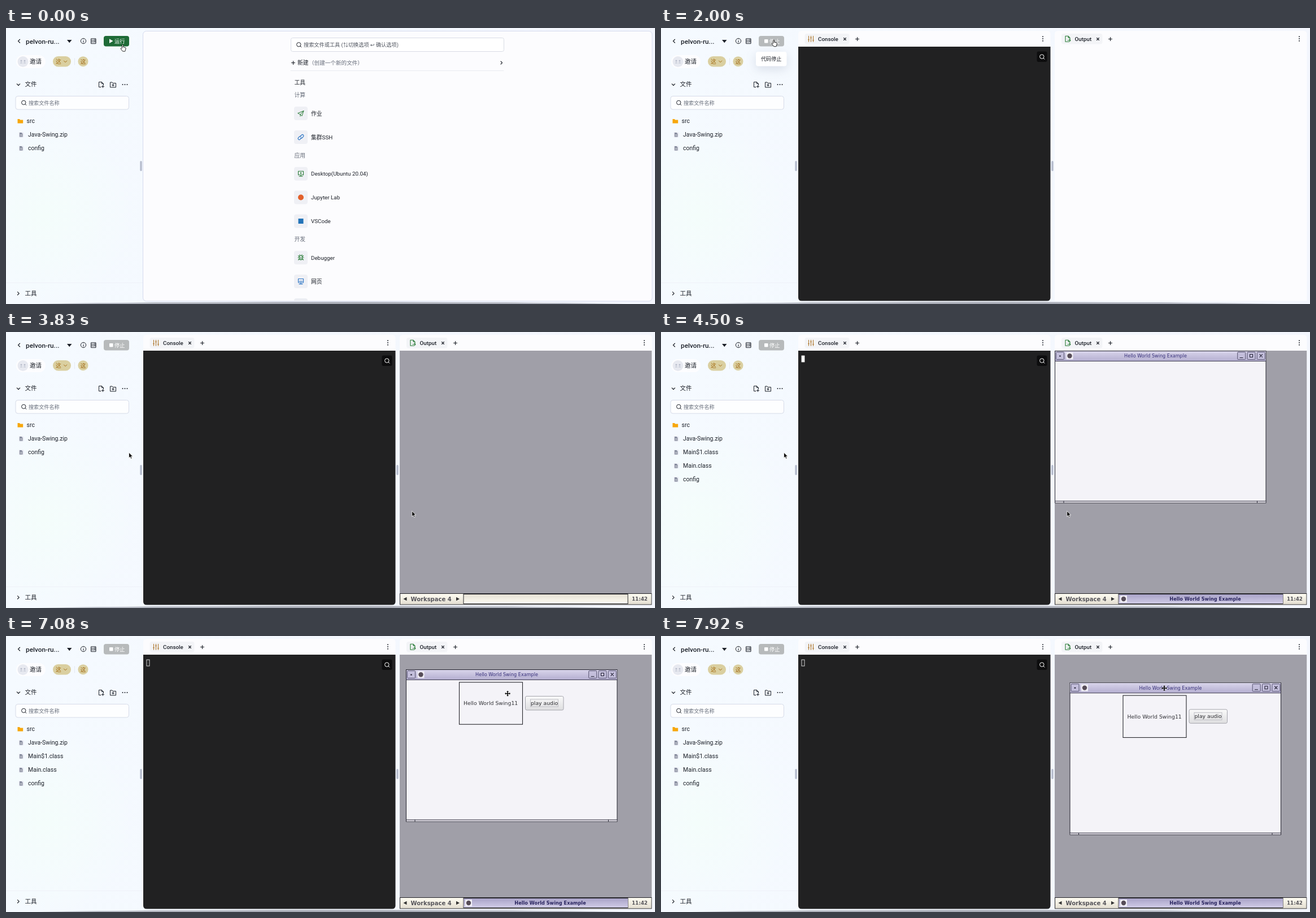
Write an HTML page that moves like this. It is 1149 px wide and 488 px high and loops after 8 s.

```html
<!DOCTYPE html>
<html lang="zh">
<head>
<meta charset="utf-8">
<title>Workspace</title>
<style>
html, body { margin: 0; width: 100%; height: 100%; overflow: hidden; background: #f4f8fd; }
svg { display: block; width: 100vw; height: 100vh; }
text { font-family: Roboto, "Noto Sans CJK SC", "Noto Sans CJK", "DejaVu Sans", sans-serif; white-space: pre; }
.dv { font-family: "DejaVu Sans", sans-serif; }
.line { fill: none; stroke-linecap: round; stroke-linejoin: round; }
#tip rect { filter: drop-shadow(0 5px 9px rgba(70, 80, 110, .16)); }
</style>
</head>
<body>
<svg id="stage" viewBox="0 0 1149 488" xmlns="http://www.w3.org/2000/svg"></svg>
<script>
const INK = '#1d2129', GREY = '#676d7a', GREEN = '#277a35', BLUE = '#2b74c4';

// Text placed by its left edge (or anchor) and its vertical centre.
const text = (x, mid, str, size = 9.8, fill = INK, extra = '') =>
  `<text x="${x}" y="${mid + size * .36}" font-size="${size}" fill="${fill}" ${extra}>${str}</text>`;
const rect = (x, y, w, h, fill, rx = 0, extra = '') =>
  `<rect x="${x}" y="${y}" width="${w}" height="${h}" rx="${rx}" fill="${fill}" ${extra}/>`;
const line = (d, stroke = INK, width = 1) =>
  `<path class="line" d="${d}" stroke="${stroke}" stroke-width="${width}"/>`;
const shape = (d, fill) => `<path d="${d}" fill="${fill}"/>`;
const circle = (x, y, r, fill, extra = '') =>
  `<circle cx="${x}" cy="${y}" r="${r}" fill="${fill}" ${extra}/>`;
const at = (x, y, inner) => `<g transform="translate(${x} ${y})">${inner}</g>`;
const group = (id, inner) => `<g id="${id}">${inner}</g>`;

const lens = (x, y, stroke = INK) => at(x, y,
  circle(-.4, -.4, 3.7, 'none', `stroke="${stroke}" stroke-width="1"`) + line('M2.3 2.3L4.2 4.2', stroke));
const plus = (x, y) => line(`M${x - 3} ${y}h6m-3 -3v6`, INK, 1.2);
const cross = (x, y) => line(`M${x - 2} ${y - 2}l4 4m0 -4l-4 4`, INK, 1.1);
const dots = (x, y, dx, dy) => [-1, 0, 1].map(i => circle(x + i * dx, y + i * dy, 1, INK)).join('');
const medium = 'font-weight="500"';

const gradient = (id, from, to, vertical = true) =>
  `<linearGradient id="${id}" x2="${vertical ? 0 : 1}" y2="${vertical ? 1 : 0}">
    <stop stop-color="${from}"/><stop offset="1" stop-color="${to}"/></linearGradient>`;

const defs = `<defs>
  ${gradient('side', '#f5faff', '#f3f6fd', false)}
  ${gradient('lilac', '#d8d4ea', '#b4aed0')}
  ${gradient('cream', '#fffdf3', '#e2ddd0')}
  ${gradient('slot', '#e4dfd3', '#fffdf4')}
  ${gradient('task', '#a9a3c8', '#d0cbe6')}
  ${gradient('push', '#fafafa', '#dedee0')}
  <radialGradient id="mint"><stop stop-color="#f4fdfb"/><stop offset="1" stop-color="#f4fdfb" stop-opacity="0"/></radialGradient>
  <radialGradient id="shade"><stop stop-color="#777a85" stop-opacity=".75"/><stop offset=".9" stop-color="#888b98" stop-opacity=".55"/>
    <stop offset="1" stop-color="#999" stop-opacity="0"/></radialGradient>
  <clipPath id="mainClip"><rect x="243" y="6" width="901" height="477" rx="6"/></clipPath>
  <clipPath id="outClip"><rect x="697" y="33" width="446.500" height="449.500" rx="0"/></clipPath>
</defs>`;

const fileIcon = y => rect(22, y - 4.5, 9.5, 9.5, '#eceef5', 2) +
  shape(`M24 ${y - 3.5}h3.5l2 2v5.500h-5.500z`, '#858b9d') +
  line(`M25.500 ${y}h2.500m-2.500 2h2.500`, '#fff', .7);
const fileRow = (y, name) => at(0, 0, fileIcon(y) + text(39, y, name, 10.5));

function sidebar() {
  const people = [27, 33].map(x => circle(x, 58, 1.5, '#b9bdcb') +
    shape(`M${x - 2.5} 62.500q2.500 -4 5 0z`, '#c6cad6')).join('');
  return rect(0, 0, 1149, 488, 'url(#side)') +
    '<ellipse cx="70" cy="330" rx="160" ry="170" fill="url(#mint)"/>' +
    line('M24.500 20.200l-3 2.900 3 2.900', INK, 1.3) +
    text(35, 23.3, 'pelvon-ru...', 11.8, INK, medium) +
    shape('M108 21h8.500l-4.250 5.200z', INK) +
    circle(137, 23, 4.6, 'none', `stroke="${INK}"`) + line('M137 22.700v2.600M137 20.700v.1', INK, 1.1) +
    line('M151 18.800h8v8.800h-8zM151 21.700h8m-8 2.900h8M157 20.300h.3m-.3 2.900h.3', INK, 1) +
    rect(18, 48, 52, 23, '#fdfdff', 11.5) + circle(30, 59.5, 9.5, '#e7e9f0') + people +
    text(42, 59, '邀请', 10.5) +
    rect(83, 50, 32, 18.500, '#dacfa0', 9.2) + text(88, 59.2, '这', 9.8, '#a36b12') +
    line('M102.500 58l2.600 2.600 2.600 -2.600', '#a36b12') +
    line('M121.500 53.500v11.500', '#e6e9f1') +
    circle(136.500, 59.2, 9, '#dacfa0') + text(131.700, 59.2, '这', 9.6, '#9a5f08') +
    line('M19.300 98.800l2.700 2.700 2.700 -2.700', INK, 1.2) + text(33.500, 99.6, '文件', 10.5, INK, medium) +
    line('M168 104.500h-3.500v-9h5l3 3v2.500M169.500 95.500v3h3M171.500 101.500v4m-2 -2h4') +
    line('M184.500 104.500v-8.500h3.500l1.200 1.500h5.300v7zM189.500 99v4m-2 -2h4') +
    dots(210.500, 100, 4, 0) +
    rect(17, 120.500, 200.500, 23.500, '#fdfeff', 4, 'id="field" stroke="#d6dbe8"') +
    lens(31.700, 132.300) + text(40, 132.300, '搜索文件名称', 9.1, GREY) +
    shape('M20.500 161h3.500l1.200 1.500h5v6h-9.700z', '#f7a70d') + text(36.500, 164.500, 'src', 10.5) +
    fileRow(188.500, 'Java-Swing.zip') +
    group('classes', fileRow(212.500, 'Main$1.class') + fileRow(236.500, 'Main.class')) +
    group('config', fileRow(212.500, 'config')) +
    line('M0 450.500h242', '#eef1f8') +
    line('M20.500 466.600l2.700 2.700 -2.700 2.700', INK, 1.2) + text(33.500, 469, '工具', 10.5, INK, medium) +
    '<ellipse cx="575" cy="489" rx="550" ry="5" fill="url(#shade)"/>' +
    rect(237.300, 235, 3.400, 18, '#b6bccd', 1.7);
}

const runButton = group('run', rect(173, 14, 45, 18.500, '#1f6b37', 4) +
    shape('M183 19.300v7.600l6.600 -3.800z', '#fff') + text(192, 23.3, '运行', 9.3, '#fff')) +
  group('stop', rect(173, 14, 45, 18.500, '#b7babb', 4) +
    group('stopLabel', rect(183, 20, 6.500, 6.500, '#fff', 1) + text(192, 23.3, '停止', 9.3, '#fff')));

const monitor = c => line('M-4.500 -4.500h9v6.500h-9zM0 2v2.500M-3 4.600h6', c, 1.1);
const toolIcons = {
  plane: line('M-5 -.5L5 -4.500 2 4.500 -1 2zM5 -4.500L-1 2v3', GREEN, 1),
  link: line('M-.5 -2l1.800 -1.800a2 2 0 0 1 3 3l-1.800 1.800a2 2 0 0 1 -2.800 0M.5 2l-1.800 1.800a2 2 0 0 1 -3 -3l1.800 -1.800a2 2 0 0 1 2.800 0', BLUE, 1.1),
  desk: monitor(GREEN) + circle(0, -1.2, 1.3, GREEN),
  orange: circle(0, 0, 5, '#e2602b'),
  blue: rect(-4.500, -4.500, 9, 9, '#2273b8'),
  bug: line('M-2.500 -1.500a2.500 2.500 0 0 1 5 0v3a2.500 2.500 0 0 1 -5 0zM-2.500 0h-2.500M2.500 0h2.500M-2.500 -1.500l-2 -1.800M2.500 -1.500l2 -1.800M-2.500 2l-2 2M2.500 2l2 2M0 -1v3.500M-1.500 -4l-.8 -1M1.500 -4l.8 -1', GREEN, 1.1),
  web: monitor(BLUE) + line('M-3 -.2h6', BLUE)
};
const tool = (y, icon, label) => rect(510, y - 12, 24, 24, '#eff0f5', 4) +
  at(522, y, toolIcons[icon]) + text(540, y, label);

const home = group('home',
  rect(242.500, 5.500, 901.500, 477.500, '#fcfcfe', 6, 'stroke="#d5daee"') +
  '<g clip-path="url(#mainClip)">' +
  rect(504.500, 17.500, 377, 24, '#fff', 3, 'stroke="#d9dce5"') + lens(518.700, 29.700) +
  text(527, 29.700, '搜索文件或工具 (⇅切换选项 ↩ 确认选项)', 9.2, '#50555f') +
  plus(508.500, 61.500) + text(516, 61.300, '新建', 9.8, INK, medium) + text(536, 61.300, '（创建一个新的文件）', 9.6, GREY) +
  line('M876 59l2.500 2.500 -2.500 2.500', INK, 1.1) + line('M504 75.500h377', '#e9ebf0') +
  text(510.500, 96, '工具', 9.8, INK) + text(510.500, 118.500, '计算', 9.8, GREY) +
  tool(151, 'plane', '作业') + tool(193, 'link', '集群SSH') +
  text(510.500, 225, '应用', 9.8, GREY) +
  tool(257.700, 'desk', 'Desktop(Ubuntu 20.04)') + tool(299.500, 'orange', 'Jupyter Lab') + tool(341.500, 'blue', 'VSCode') +
  text(510.500, 373.500, '开发', 9.8, GREY) +
  tool(406, 'bug', 'Debugger') + tool(448, 'web', '网页') + rect(510, 478, 24, 24, '#eceef3', 4) + '</g>');

const panel = (x, w, tab, label, tabW, icon) =>
  `<path d="M${x} 33v-22q0 -6 6 -6h${w - 12}q6 0 6 6v22z" fill="#fcfcfe"/>` +
  rect(tab, 10, tabW, 18.500, '#f3f4f7', 4) + at(tab + 11, 19.3, icon) +
  text(tab + 23.500, 19.3, label, 9.8, INK, medium) +
  cross(tab + tabW - 8, 19.5) + plus(tab + tabW + 14, 19.5) + dots(x + w - 13.500, 19, 0, 3.700);

const sliders = line('M-4 -5v10M0 -5v10M4 -5v10M-5 1.500h2M-1 -2h2M3 2.500h2', '#b0782f', 1.1);
const exportIcon = line('M2 5h-6v-10h5l3 3v2.500M1 -5v3h3M0 2.500h5m-2 -2l2 2 -2 2', GREEN, 1.1);

const consolePanel = group('console',
  panel(243, 446.500, 254.500, 'Console', 79, sliders) +
  shape('M243 33h446.500v443.500q0 6 -6 6h-434.500q-6 0 -6 -6z', '#212122') +
  rect(665.500, 41.500, 18, 18.500, '#0d0d0e', 3) + lens(674.700, 51, '#fff') +
  rect(249, 42, 5, 11, '#fff', 0, 'id="caret" stroke="#fff" stroke-width=".8"'));

const frameButton = (x, glyph) => rect(x, 35.500, 14, 13, '#c3bedb', 1, 'stroke="#55526e"') + line(glyph, '#1f1d30', 1.1);
const appIcon = (x, y) => rect(x - 6, y - 6, 12, 12, '#f1eff6') + circle(x, y, 4.2, '#574d58');

const javaWindow = group('window',
  rect(697.500, 33.500, 373.500, 268.500, '#f4f3f8', 0, 'stroke="#23222d"') +
  rect(698, 34, 372.500, 17.500, 'url(#lilac)') + line('M697.500 51.500h373.500', '#3c3a4e') +
  frameButton(699.500, 'M705.700 42h1.500v1h-1.500z') + appIcon(723.500, 42.300) +
  text(875.500, 42.300, 'Hello World Swing Example', 8.1, '#37307a', 'class="dv" text-anchor="middle"') +
  frameButton(1020.700, 'M1025 45.500h5') + frameButton(1038, 'M1042.500 39.500h5v5h-5z') + frameButton(1055.300, 'M1060 39.700l4.600 4.600m0 -4.600l-4.600 4.600') +
  rect(698, 299, 372.500, 2.500, '#e9e6ee') + line('M697.500 299h373.500M713 299v3M1055.500 299v3', '#2b2a38') +
  group('content',
    rect(791.500, 55.800, 112, 74.400, 'none', 0, 'stroke="#26262b" stroke-width="1.1"') +
    text(799, 93, 'Hello World Swing11', 9.36, '#333338', 'class="dv"') +
    rect(908.500, 80.500, 67.500, 24.500, 'url(#push)', 2.5, 'stroke="#a5a5ad"') +
    rect(917.500, 86, 49, 13, 'none', 0, 'stroke="#b3b3bb" stroke-width=".8"') +
    text(918, 92.300, 'play audio', 9.25, '#28282c', 'class="dv"')));

const outputPanel = group('output',
  panel(697, 446.500, 709, 'Output', 72.500, exportIcon) +
  rect(697, 33, 446.500, 449.500, '#fcfcfe') +
  '<g id="desktop" clip-path="url(#outClip)">' + rect(697, 33, 446.500, 450, '#a09fa8') + javaWindow +
  rect(697.500, 462.500, 445.500, 19.500, 'url(#cream)', 0, 'stroke="#26262b"') +
  shape('M709.500 468.800v6.400l-6 -3.200zM797 468.800v6.400l6 -3.200z', '#333') +
  text(716.500, 472.300, 'Workspace 4', 10, '#55545a', 'class="dv" font-weight="700"') +
  rect(810, 463.500, 291, 17, 'url(#slot)', 0, 'stroke="#26262b"') +
  group('task', rect(810.500, 464, 290.500, 16, 'url(#task)') + appIcon(819, 472) +
    text(963.500, 471.700, 'Hello World Swing Example', 8.2, '#28235e', 'class="dv" font-weight="700" text-anchor="middle"')) +
  text(1108, 472, '11:42', 8.75, '#55545a', 'class="dv" font-weight="700"') + '</g>');

const tooltip = group('tip', rect(168, 42, 54.500, 25.500, '#fff', 4) +
  '<text id="tipText" x="177" y="57.600" font-size="9.1" fill="#1d2129"></text>');

const arrow = id => group(id, '<path d="M0 0v9.800l2.300 -2 1.500 3.500 1.700 -.7 -1.500 -3.500h3z" fill="#0c0c0c" stroke="#fff" stroke-width=".8"/>');
const cursors = arrow('remote') + arrow('pointer') +
  group('hand', '<path d="M3 6.400V1.300a1 1 0 0 1 2 0v3.200l3.600 .8a1.400 1.400 0 0 1 1 1.600l-.7 3.400 -.6 1.700h-4.200l-3.300 -4.300a.9 .9 0 0 1 1.300 -1.200z" fill="#fff" stroke="#111" stroke-width=".9"/>') +
  group('move', '<path d="M0 -5l2 2h-1.200v2.200h2.200v-1.200l2 2 -2 2v-1.200h-2.200v2.200h1.200l-2 2 -2 -2h1.200v-2.200h-2.200v1.200l-2 -2 2 -2v1.200h2.200v-2.200h-1.200z" fill="#0a0a0a" stroke="#fff" stroke-width=".7" paint-order="stroke"/>');

const stage = document.getElementById('stage');
stage.innerHTML = defs + sidebar() + runButton + home +
  group('work', consolePanel + outputPanel + rect(691.300, 235, 3.400, 18, '#b6bccd', 1.7)) + tooltip + cursors;

const el = Object.fromEntries([...stage.querySelectorAll('[id]')].map(node => [node.id, node]));
const show = (id, on) => el[id].setAttribute('display', on ? 'inline' : 'none');
const place = (id, [x, y]) => el[id].setAttribute('transform', `translate(${x} ${y})`);

// Position on a polyline of [step, x, y] keys.
function along(keys, s) {
  const i = keys.findIndex(key => key[0] > s);
  if (i < 0) return keys[keys.length - 1].slice(1);
  if (i === 0) return keys[0].slice(1);
  const [a, b] = [keys[i - 1], keys[i]], u = (s - a[0]) / (b[0] - a[0]);
  return [a[1] + (b[1] - a[1]) * u, a[2] + (b[2] - a[2]) * u];
}

const handPath = [[0, 202.500, 29.200], [1, 202.200, 29], [2, 202.200, 29], [6, 196, 21], [11, 196, 21], [13, 195.700, 20.700], [28, 195.700, 20.700], [29, 195, 28.500]];
const pointerPath = [[29, 202, 47.500], [31, 208, 108], [33, 214, 170], [36, 217, 215], [41, 217, 215], [43, 217.500, 213],
  [67, 217.500, 213], [68, 252.500, 210], [70, 370, 186], [72, 575, 145], [74, 740, 88], [76, 842, 50], [77, 857, 44]];
const dragPath = [[80, 0, 0], [82, 2, 5], [84, 7, 17], [85, 11, 26], [86, 20, 48], [87, 26, 66], [88, 27, 78], [89, 21, 88],
  [90, 9, 89], [91, 0, 80], [92, 1, 66], [93, 9, 54], [94, 19, 48], [95, 26.500, 49.300]];

const LOOP = 8000, STEP = 1000 / 12;

function draw(ms) {
  const s = Math.floor((ms % LOOP + 5) / STEP);
  const running = s >= 23, entered = s >= 74, dragging = s >= 80;

  show('run', !running);
  show('stop', running);
  el.stopLabel.setAttribute('opacity', s === 23 ? .5 : 1);
  show('home', s < 24);
  show('work', s >= 24);
  show('desktop', s >= 29);
  el.field.setAttribute('stroke', s === 31 || s === 32 ? '#8fb0ec' : '#d6dbe8');

  show('tip', s >= 3 && s < 33);
  el.tip.setAttribute('opacity', s < 24 ? Math.min(1, (s - 2) / 4) : Math.min(1, (33 - s) / 3));
  el.tipText.textContent = running ? '代码停止' : '代码运行';

  show('classes', s >= 52);
  place('config', [0, s >= 52 ? 48 : 0]);
  show('window', s >= 54);
  show('task', s >= 54);
  show('content', s >= 55);

  // The caret blinks every seven steps and turns hollow once focus leaves.
  const hollow = s >= 78;
  show('caret', hollow || Math.floor((s - 25) / 7) % 2 === 0);
  el.caret.setAttribute('fill', hollow ? 'none' : '#fff');

  place('window', along(dragPath, s));
  const [dx, dy] = along(dragPath, s + 1.6);
  place('move', [864.500 + dx, 43 + dy]);
  show('move', dragging);

  show('hand', s <= 29);
  place('hand', along(handPath, s));
  show('pointer', s >= 29 && !dragging);
  const pointer = along(pointerPath, s);
  place('pointer', s > 77 ? [857 + (s - 77) * 2, 43] : pointer);
  show('remote', s >= 29 && !entered);
  place('remote', [718.700, 316.500]);
}

const start = performance.now();
function tick() {
  draw(performance.now() - start);
  requestAnimationFrame(tick);
}
tick();
</script>
</body>
</html>
```
